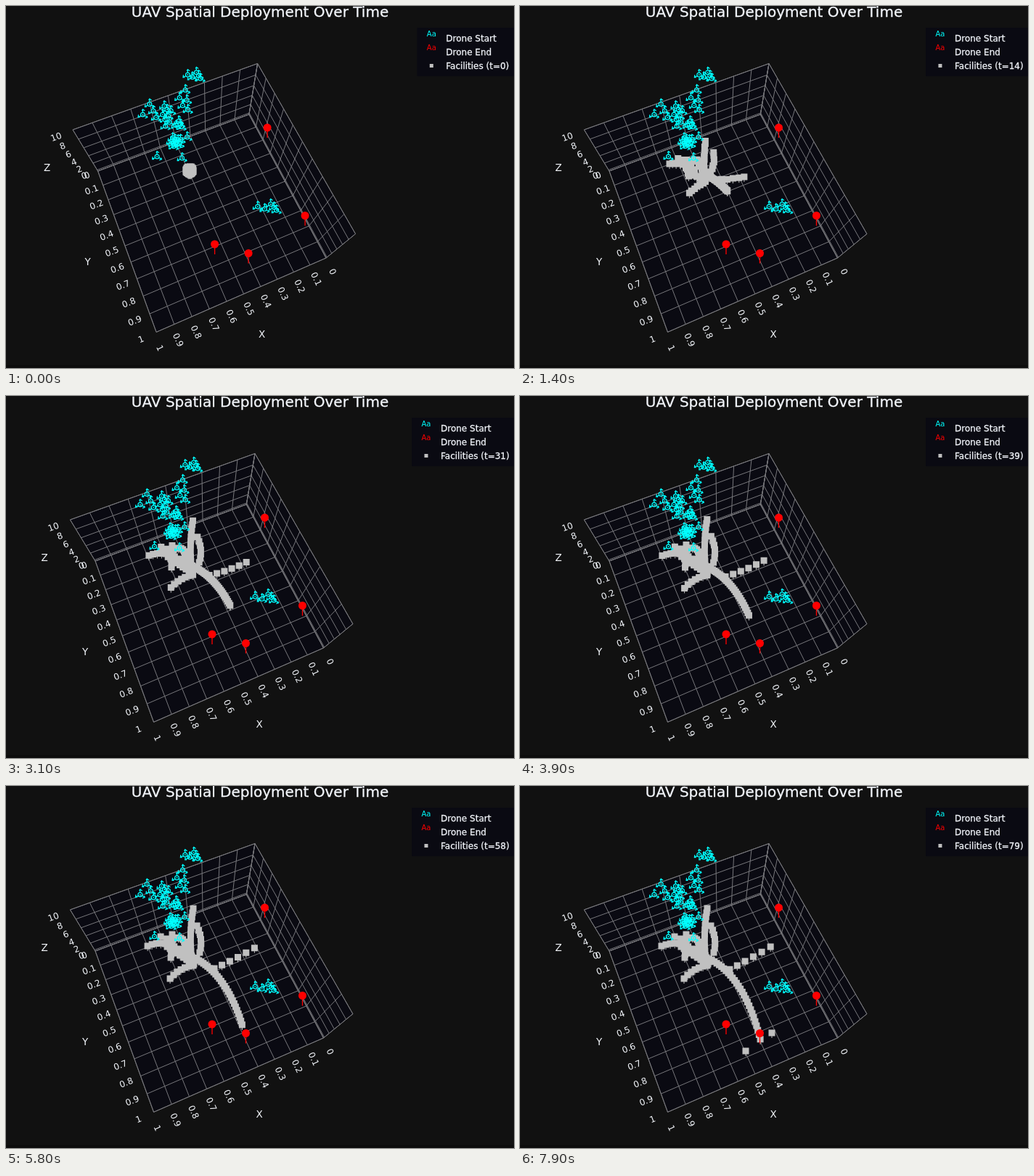
An HTML page that plays this animation: 700x500 px, repeating every 8000 ms.

```html
<!DOCTYPE html>
<html lang="en">
<head>
<meta charset="utf-8">
<title>UAV Spatial Deployment Over Time</title>
<style>
  html, body { margin: 0; width: 100%; height: 100%; overflow: hidden; background: #111; }
  svg { display: block; width: 700px; height: 500px; font: 12px "DejaVu Sans", sans-serif; fill: #f2f5fa; }
  .tick { text-anchor: middle; dominant-baseline: central; }
  .bold { stroke: #f2f5fa; stroke-width: .3; }
</style>
</head>
<body>
<svg id="stage" viewBox="0 0 700 500">
  <rect width="700" height="500" fill="#111"/>
  <rect y="496" width="700" height="4" fill="#0d0d0d"/>
  <defs>
    <g id="drone" fill="none" stroke="#0ff" stroke-width="1.25">
      <circle r="2.9"/>
      <circle r=".9" fill="#0ff" stroke="none"/>
      <path id="arm" d="M0-3V-7.2M-1.2-5.4L0-7.4L2.8-5.2"/>
      <use href="#arm" transform="rotate(120)"/>
      <use href="#arm" transform="rotate(240)"/>
    </g>
    <g id="pin">
      <path d="M0 0V14" stroke="#f00" stroke-width="1.3"/>
      <circle r="5.5" fill="#f00"/>
    </g>
  </defs>
  <g id="scene">
    <g id="box"></g>
    <path id="stems" fill="none" stroke="#c0c0c0"/>
    <path id="blocks" fill="#c0c0c0"/>
    <g id="drones"></g>
    <g id="pins"></g>
  </g>
  <text class="bold" x="350" y="15" font-size="20" text-anchor="middle">UAV Spatial Deployment Over Time</text>
  <g id="legend">
    <rect y="30" width="150" height="67" fill="#0a0a12"/>
    <text x="20" y="42" font-size="10" text-anchor="middle" fill="#0ff">Aa</text>
    <text x="20" y="61" font-size="10" text-anchor="middle" fill="#f00">Aa</text>
    <rect x="17.5" y="80" width="5" height="5" fill="#c0c0c0"/>
    <g class="bold">
      <text x="40" y="49">Drone Start</text>
      <text x="40" y="68">Drone End</text>
      <text x="40" y="87" id="counter"></text>
    </g>
  </g>
</svg>
<script>
const $ = id => document.getElementById(id);
const mix = (a, b, k) => a + (b - a) * k;
const mixPoint = (p, q, k) => [mix(p[0], q[0], k), mix(p[1], q[1], k)];

// Perspective of the unit box: homogeneous corners (x*w, y*w, w).
const corner = (x, y, w) => [x * w, y * w, w];
const O = corner(331.3, 149.7, 1), U = corner(123, 228, .95),
      V = corner(437.5, 348, .873), S = corner(343, 79.5, .825);
function project(u, v, s) {
  const [x, y, w] = O.map((o, i) => o + u * (U[i] - o) + v * (V[i] - o) + s * (S[i] - o));
  return [x / w, y / w];
}

function buildBox() {
  const LOW = -.035;
  const poly = pts => 'M' + pts.map(p => project(...p).map(n => n.toFixed(2))).join('L');
  const floor = [[0,0,0], [1,0,0], [1,1,0], [0,1,0]];
  const back = [[0,0,0], [1,0,0], [1,0,1], [0,0,1]];
  const side = [[0,0,0], [0,1,0], [0,1,1], [0,0,1]];
  const faces = [floor, back, side].map(f => poly(f) + 'Z').join('');
  let lines = faces, labels = '';
  const label = (text, [x, y], dx, dy, turn) => {
    labels += `<text class="tick" transform="translate(${x + dx} ${y + dy}) rotate(${turn})">${text}</text>`;
  };
  for (let i = 0; i <= 10; i++) {
    const n = i / 10, z = (n - LOW) / (1 - LOW);
    lines += poly([[n,1,0], [n,0,0], [n,0,1]]) + poly([[1,n,0], [0,n,0], [0,n,1]]);
    label(n, project(n, 1, 0), mix(9, 5, n), mix(19, 22, n), 65);
    label(n, project(1, n, 0), mix(-15, -21, n), mix(6, 10, n), -21);
    if (i % 2 === 0) {
      lines += poly([[1,0,z], [0,0,z], [0,1,z]]);
      label(i, project(1, 0, z), mix(-18, -23, n), mix(8, 10, n), -20);
    }
  }
  $('box').innerHTML = `<path d="${faces}" fill="#0a0a12"/>
    <path d="${lines}" fill="none" stroke="#77777b"/>${labels}
    <g font-size="13.5"><text class="tick" x="349" y="453">X</text>
    <text class="tick" x="109" y="353">Y</text><text class="tick" x="53" y="223">Z</text></g>`;
}

// Golden-angle scatter inside an ellipse.
function scatter({ x, y, rx = 0, ry = 0, count = 1 }) {
  return Array.from({ length: count }, (_, i) => {
    const r = Math.sqrt((i + .5) / count), a = i * 2.4;
    return [x + rx * r * Math.cos(a), y + ry * r * Math.sin(a)];
  });
}
const SWARMS = [
  { x: 258, y: 96, rx: 12, ry: 6, count: 5 },
  { x: 243, y: 130, rx: 8, ry: 20, count: 5 },
  { x: 193, y: 145, rx: 18, ry: 12, count: 4 },
  { x: 218, y: 152, rx: 8, ry: 16, count: 8 },
  { x: 234, y: 163, rx: 7, ry: 5, count: 4 },
  { x: 229, y: 188, rx: 7, ry: 7, count: 9 },
  { x: 242, y: 181, rx: 8, ry: 6, count: 2 },
  { x: 204.5, y: 208 },
  { x: 239, y: 210 },
  { x: 360, y: 278, rx: 18, ry: 6, count: 5 }
];
const PINS = [[356.5, 168], [408.5, 289.5], [284, 329], [330.5, 341.5]];

// Branches grow out of the origin along a quadratic curve; slow is the time constant.
const ORIGIN = [249.4, 227];
const branch = (count, slow, root, bend, tip) => ({ count, slow, root, bend, tip });
const TRUNK = branch(30, 40, [254, 237], [316, 259], [338, 382]);
const BRANCHES = [
  TRUNK,
  branch(6, 22, [290, 254], [315, 240], [347, 221]),
  branch(13, 10, [256, 240], [252, 204], [258, 169]),
  branch(7, 10, [267, 230], [272, 212], [263, 193]),
  branch(8, 10, [238, 225], [216, 212], [195, 221]),
  branch(3, 10, [230, 212], [222, 212], [213, 208]),
  branch(7, 10, [258, 248], [240, 250], [226, 266]),
  branch(8, 10, [227, 237], [229, 221], [229, 205]),
  branch(9, 10, [222, 222], [240, 234], [259, 246]),
  branch(8, 10, [233, 210], [250, 206], [246, 232])
];
const STRAYS = [[311, 366], [347, 341]], LEAVE = 71, ARRIVE = 79;

function pointOn({ slow, root, bend, tip }, s, t) {
  const reach = 1 - Math.exp(-t / slow), at = s * reach;
  const start = mixPoint(ORIGIN, root, reach);
  return mixPoint(mixPoint(start, bend, at), mixPoint(bend, tip, at), at);
}

function blockPositions(t) {
  const points = [];
  for (const b of BRANCHES)
    for (let i = 0; i < b.count; i++) points.push(pointOn(b, i / (b.count - 1), t));
  const away = Math.min(1, Math.max(0, (t - LEAVE) / (ARRIVE - LEAVE)));
  for (const goal of STRAYS) points.push(mixPoint(pointOn(TRUNK, 1, t), goal, away));

  const loose = 5.5 * Math.exp(-t / 6);
  const jitter = scatter({ x: 0, y: 0, rx: loose, ry: loose, count: points.length });
  return points.map(([x, y], i) => [x + jitter[i][0], y + jitter[i][1]]);
}

let shown = -1;
function draw(t) {
  if (t === shown) return;
  shown = t;
  const wide = t > 9;
  $('scene').setAttribute('transform', `translate(${wide ? 0 : 3.6} 0)`);
  $('legend').setAttribute('transform', `translate(${wide ? 559 : 566.3} 0)`);
  $('counter').textContent = `Facilities (t=${t})`;
  const points = blockPositions(t).map(p => p.map(n => +n.toFixed(1)));
  $('blocks').setAttribute('d', points.map(([x, y]) => `M${x - 4.5} ${y - 4.5}h9v9h-9z`).join(''));
  $('stems').setAttribute('d', points.map(([x, y]) => `M${x} ${y}v7`).join(''));
}

const place = (id, points) => points.map(([x, y]) => `<use href="#${id}" x="${x}" y="${y}"/>`).join('');
buildBox();
$('drones').innerHTML = place('drone', SWARMS.flatMap(scatter));
$('pins').innerHTML = place('pin', PINS);
const start = performance.now();
function frame() {
  draw(Math.floor(Math.max(0, performance.now() - start) % 8000 / 100));
  requestAnimationFrame(frame);
}
frame();
</script>
</body>
</html>
```
